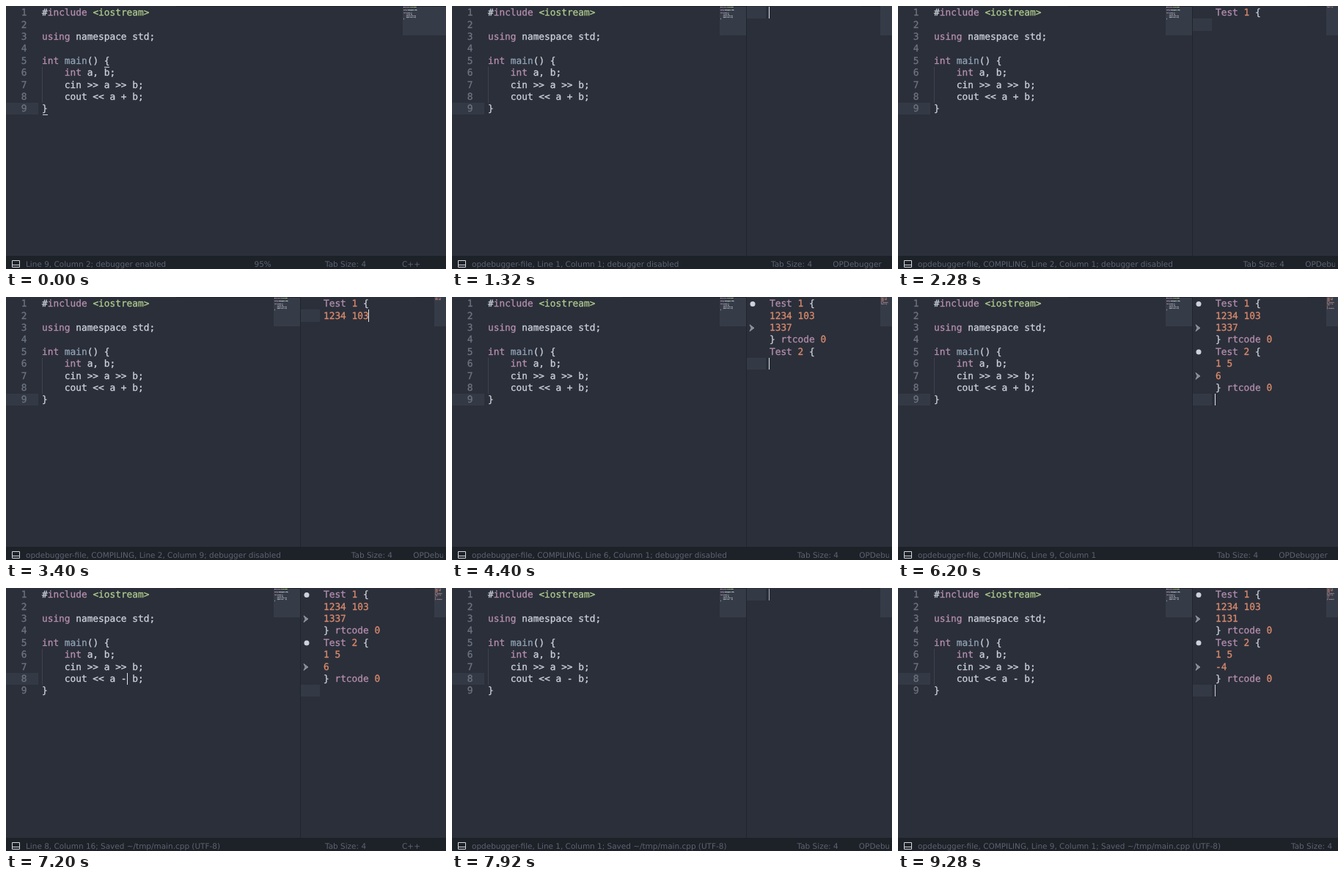
Animation of 600 by 359 pixels, one loop 9.36 s. Source, as an HTML page:

```html
<!DOCTYPE html>
<html lang="en">
<head>
<meta charset="utf-8">
<title>Editor with a test debugger</title>
<style>
html, body { margin: 0; width: 100%; height: 100%; overflow: hidden; background: #2b2f3a; }
body { position: relative; color: #ccd1da; text-rendering: geometricPrecision;
  font: 12.8px/16.4px "DejaVu Sans Mono", monospace; }
div, pre, svg { position: absolute; margin: 0; }
pre { font: inherit; -webkit-text-stroke: .3px; }
b { font-weight: normal; color: #b48ead; }
i { font-style: normal; color: #d98a6c; }
u { text-decoration: none; color: #aecb8c; }
s { text-decoration: none; color: #8fa1b3; }
.band { background: #343a45; height: 16.6px; }
.map { background: #363c47; top: 0; height: 40px; overflow: hidden; }
.map pre { left: 1px; top: 1px; transform: scale(.123); transform-origin: 0 0; -webkit-text-stroke: 2px; }
.edge { background: #20242c; }
.mark { background: #ccd1da; height: 1px; width: 7px; }
#numbers { left: 0; width: 28.5px; top: 2.1px; text-align: right; color: #6d7480; }
#guide { left: 49px; top: 83px; width: 1px; height: 49px; background: #3c424e; }
#code { left: 49px; top: 2.1px; }
#out { left: 433px; top: 2.1px; }
#caret { width: 1px; height: 16.6px; background: #dfe3ea; }
#bar { left: 0; right: 0; top: 341px; bottom: 0; background: #1d2128; color: #5d6471;
  font: 10.48px/18px "DejaVu Sans", sans-serif; white-space: nowrap; }
#info { left: 27px; top: 3px; width: 569px; height: 15px; line-height: 18px; overflow: hidden; display: flex; }
#msg { min-width: 312px; margin-right: 96px; flex: none; }
#tab { position: relative; flex: none; }
#lang { left: 67.5px; top: 0; width: 100px; text-align: center; }
#power { left: 338.5px; top: 3px; }
</style>
</head>
<body>
<div class="band" id="band"></div>
<pre id="numbers">1
2
3
4
5
6
7
8
9</pre>
<div id="guide"></div>
<pre id="code"></pre>
<div id="brackets"><div class="mark" style="left:134px;top:83px"></div><div class="mark" style="left:50px;top:148px"></div></div>
<div class="map" id="map"><pre></pre></div>
<div class="edge" style="left:232px;top:0;width:368px;height:1px"></div>
<div id="right">
  <div style="left:402px;top:0;width:156px;height:1px;background:#2b2f3a"></div>
  <div class="edge" style="left:401px;top:0;width:1px;height:341px"></div>
  <div class="band" id="outBand" style="left:402px;width:26px"></div>
  <svg id="signs" width="600" height="341" style="left:0;top:0"></svg>
  <pre id="out"></pre>
  <div class="map" id="outMap" style="left:584px;width:16px"><pre></pre></div>
</div>
<div id="caret"></div>
<div id="bar">
  <svg width="24" height="18" style="left:0;top:0" fill="none" stroke="#d5d8de"><path d="M8.5 6.5h10v9h-10zM8.5 12.5h10"/></svg>
  <div id="info"><span id="msg"></span><span id="tab">Tab Size: 4<div id="lang"></div></span></div>
  <div id="power">95%</div>
</div>
<script>
const LOOP = 9360, ROW = 16.4, CHAR = 7.706, TOP = 0.7;
const $ = id => document.getElementById(id);

const OFF = 'debugger disabled', SAVED = 'Saved ~/tmp/main.cpp (UTF-8)';
const START = { split: false, left: true, row: 9, op: '+', out: '', busy: false, power: true, msg: 'debugger enabled' };

// Each event changes part of the state; "add" appends to the test pane.
const events = [
  [400, { power: false }],
  [840, { msg: OFF }],
  [1200, { split: true, left: false }],
  [1680, { busy: true }],
  [1760, { add: 'Test 1 {' }],
  [1880, { add: '\n' }],
  ...typing(2680, 60, '1234 '),
  ...typing(3080, 160, '103'),
  [3520, { add: '\n' }],
  [3720, { add: '1337\n' }],
  [3880, { add: '} rtcode 0\n' }],
  [4120, { add: 'Test 2 {' }],
  [4240, { add: '\n' }],
  ...typing(4520, 80, '1 5'),
  [4760, { add: '\n' }],
  [4800, { add: '6\n' }],
  [4880, { add: '} rtcode 0\n' }],
  [4920, { msg: '' }],
  [6320, { left: true, row: 8 }],
  [6600, { op: '' }],
  [6720, { op: '-' }],
  [6960, { msg: SAVED }],
  [7360, { left: false, out: '', busy: false }],
  [8000, { busy: true }],
  [8040, { add: 'Test 1 {\n' }],
  [8120, { add: '1234 103\n' }],
  [8200, { add: '1131\n' }],
  [8280, { add: '} rtcode 0\n' }],
  [8360, { add: 'Test 2 {\n' }],
  [8440, { add: '1 5\n' }],
  [8520, { add: '-4\n' }],
  [8600, { add: '} rtcode 0\n' }]
];

// Caret opacity over time, linear between points.
const blink = [[0, 0], [280, 0], [520, 1], [760, 1], [920, 0], [1200, 0], [1200, 1],
  [2080, 1], [2280, 0], [2640, 0], [2680, 1], [5280, 1], [5400, 0], [5640, 0], [5760, 1],
  [7840, 1], [8000, .4], [8000, 1], [8960, 1], [9120, 0], [9240, 0], [9280, .9], [LOOP, .9]];

function typing(start, step, text) {
  return [...text].map((c, i) => [start + i * step, { add: c }]);
}

function caretAlpha(t) {
  const i = blink.findIndex(p => p[0] > t);
  const [t0, a0] = blink[i - 1], [t1, a1] = blink[i];
  return a0 + (a1 - a0) * (t - t0) / (t1 - t0);
}

function stateAt(count) {
  const s = { ...START };
  for (const [, { add = '', ...change }] of events.slice(0, count)) {
    Object.assign(s, change);
    s.out += add;
  }
  return s;
}

const source = op => `#<b>include</b> <u>&lt;iostream&gt;</u>

<b>using</b> namespace std;

<b>int</b> <s>main</s>() {
    <b>int</b> a, b;
    cin &gt;&gt; a &gt;&gt; b;
    cout &lt;&lt; a ${op} b;
}`;

const colour = text => text.replace(/-?\d+/g, '<i>$&</i>').replace(/Test|rtcode/g, '<b>$&</b>');
const rowTop = row => TOP + (row - 1) * ROW;
const show = (id, on) => { $(id).style.display = on ? '' : 'none'; };

// A finished test gets a dot on its title and an arrow on its answer.
function signs(lines) {
  return lines.map((line, i) => {
    if (!line.startsWith('}')) return '';
    const y = 9.5 + (i - 3) * ROW, a = y + 2 * ROW;
    return `<circle cx="410" cy="${y}" r="3.5" fill="#ccd1da"/>` +
      `<path d="M406 ${a - 4.5}l6 4.5-6 4.5 2-4.5z" fill="#858c97" stroke="#a5abb5" stroke-width=".7"/>`;
  }).join('');
}

function draw(s) {
  const lines = s.out.split('\n');
  let row = lines.length, col = lines[row - 1].length + 1;
  $('outBand').style.top = rowTop(row) + 'px';
  if (s.left) {
    row = s.row;
    col = row === 9 ? 2 : 15 + s.op.length;
  }
  const code = source(s.op), out = colour(s.out);
  $('code').innerHTML = $('map').firstChild.innerHTML = code;
  $('out').innerHTML = $('outMap').firstChild.innerHTML = out;
  $('signs').innerHTML = signs(lines);
  $('band').style.cssText = `left:0;width:43.5px;top:${rowTop(s.row)}px`;
  $('map').style.cssText = s.split ? 'left:364.5px;width:36.5px' : 'left:541px;width:59px';
  $('caret').style.left = (s.left ? 49 : 432.3) + (col - 1) * CHAR + 'px';
  $('caret').style.top = rowTop(row) + 'px';
  show('right', s.split);
  show('brackets', s.left && row === 9);
  show('power', s.power);
  const file = s.left ? '' : 'opdebugger-file, ' + (s.busy ? 'COMPILING, ' : '');
  $('msg').textContent = `${file}Line ${row}, Column ${col}${s.msg && '; ' + s.msg}`;
  $('lang').textContent = s.left ? 'C++' : 'OPDebugger';
}

let drawn = -1;
function frame() {
  const t = performance.now() % LOOP;
  const count = events.filter(e => e[0] <= t).length;
  if (count !== drawn) draw(stateAt(drawn = count));
  $('caret').style.opacity = caretAlpha(t);
  requestAnimationFrame(frame);
}
frame();
</script>
</body>
</html>
```
